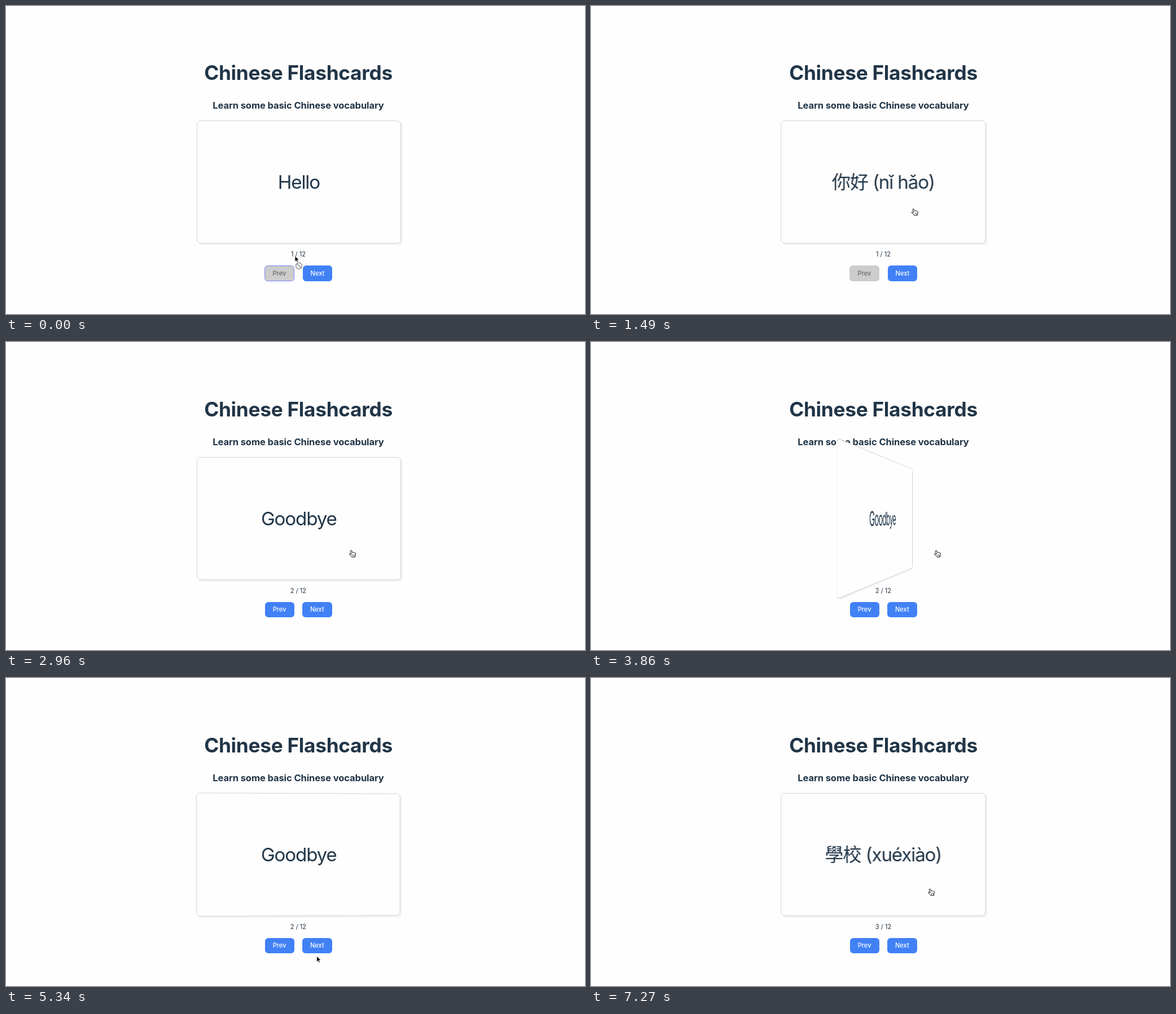
Write an HTML page that moves like this. It is 1026 by 546 pixels and loops after 8 s.

```html
<!DOCTYPE html>
<html lang="en">
<head>
<meta charset="utf-8">
<title>Flashcards</title>
<style>
  html, body { margin: 0; width: 100%; height: 100%; overflow: hidden; background: #fefefe; }
  body {
    position: relative;
    color: #213547;
    font-family: Inter, "Noto Sans CJK TC", "Noto Sans CJK SC", "Noto Sans CJK", sans-serif;
    font-optical-sizing: none;
  }
  .line {
    position: absolute; left: 18px; width: 1000px; height: 50px;
    line-height: 50px; text-align: center; white-space: nowrap;
  }
  #content { position: absolute; left: 0; top: 0; width: 1026px; height: 546px; }
  #title { top: 94px; font-size: 35.3px; font-weight: 700; letter-spacing: -.009em; }
  #sub { top: 151px; font-size: 16.6px; font-weight: 700; letter-spacing: -.008em; }
  #count { top: 415px; font-size: 11.1px; }

  #scene {
    position: absolute; left: 337.5px; top: 203px; width: 362.6px; height: 217.8px;
    perspective: 707px; perspective-origin: calc(50% - .75px) 50%;
  }
  #card {
    width: 100%; height: 100%;
    transform-style: preserve-3d; transform-origin: calc(50% - .75px) 50%;
  }
  .face {
    position: absolute; inset: 0; box-sizing: border-box;
    display: flex; align-items: center; justify-content: center;
    background: #fefefe; border: 1px solid #d2d2d2; border-radius: 7px;
    box-shadow: 2.5px 2.5px 2px rgba(0, 0, 0, .06);
    font-size: 33.2px; line-height: 50px; letter-spacing: -.035em; white-space: nowrap;
    backface-visibility: hidden;
  }
  #back { transform: rotateY(180deg); }

  .btn {
    position: absolute; box-sizing: border-box; top: 460.8px; height: 26.8px;
    display: flex; align-items: center; justify-content: center;
    border-radius: 5.7px; background: #4181f6; color: #fff;
    font-size: 11.1px; font-weight: 500; line-height: 14px;
  }
  #prev { left: 458.6px; width: 52px; }
  #next { left: 525px; width: 52.6px; }
  #next.hover { background: #2f6be8; }
  .first .btn { top: 460px; height: 28.2px; }
  .first #prev { left: 457.9px; width: 53.3px; background: #ccc; color: #6a6a6a; }
  .first #prev.hover { border: 1px solid #7d83fb; }
  .first #next { left: 525.7px; }

  #pointer { position: absolute; left: 0; top: 0; width: 24px; height: 30px; overflow: visible; }
</style>
</head>
<body>
<div id="content">
  <div id="title" class="line">Chinese Flashcards</div>
  <div id="sub" class="line">Learn some basic Chinese vocabulary</div>
  <div id="scene">
    <div id="card">
      <div id="front" class="face"></div>
      <div id="back" class="face"></div>
    </div>
  </div>
  <div id="count" class="line"></div>
</div>
<div id="buttons">
  <div id="prev" class="btn">Prev</div>
  <div id="next" class="btn">Next</div>
</div>
<svg id="pointer">
  <g id="arrow">
    <path d="M0 0V10.4L2.4 8.2L4 11.8L5.7 11L4.1 7.6L7.3 7.3Z" fill="#000" stroke="#fff" stroke-width=".8"/>
  </g>
  <g id="badge" fill="none">
    <circle cx="7" cy="17.6" r="5.4" fill="#fff" stroke="#fff" stroke-width="3"/>
    <path d="M3.2 13.8L10.8 21.4" stroke="#8c8c8c" stroke-width="1.5"/>
    <circle cx="7" cy="17.6" r="5.4" stroke="#8c8c8c" stroke-width="1.5"/>
  </g>
  <g id="hand" stroke="#000" stroke-linejoin="round" stroke-linecap="round">
    <path stroke-width=".95" fill="#fff" d="M-1.3 1.5Q-.8 -.1 .6 .7L2.3 4.3Q3.8 3.4 4.5 4.5Q5.9 3.8 6.4 5Q7.9 4.7 7.9 6.3Q8 8.6 6.9 10.1V12.2H1.4Q.6 10.4 -2.7 7.9Q-3.9 6.5 -2.6 6.1Q-1.6 5.9 .2 7Z"/>
    <path stroke-width=".6" fill="none" d="M2.6 8V10M4.2 8V10M5.8 8V10"/>
  </g>
</svg>
<script>
const LOOP = 8000, STEP = 148, FLIP_MS = 600;

const words = [
  ["Hello", "你好 (nǐ hǎo)"],
  ["Goodbye", "再見 (zàijiàn)"],
  ["School", "學校 (xuéxiào)"]
];
const nextClicks = [2600, 5700];
const cardClicks = [834, 1864, 3704, 4800, 6614];

// time, x, y of the pointer's tip
const path = [
  [0, 512, 443], [148, 518, 425], [296, 544, 395], [444, 565, 370], [592, 571.4, 359],
  [2072, 571.4, 359], [2220, 561, 440], [2368, 552, 506], [2516, 551, 491],
  [2664, 550, 476], [2812, 584, 418], [2960, 611.7, 369],
  [4884, 611.7, 369], [5032, 604, 390], [5180, 574, 455], [5328, 550.6, 493],
  [5476, 550, 484], [5624, 550, 476], [5920, 551, 474], [6068, 579, 418], [6216, 600.7, 373.4]
];

const $ = id => document.getElementById(id);
const show = (id, on) => { $(id).style.display = on ? "" : "none"; };
const put = (id, text) => { if ($(id).textContent !== text) $(id).textContent = text; };
const countBefore = (times, t) => times.filter(c => c <= t).length;
const inside = (x, y, l, t, r, b) => x > l && x < r && y > t && y < b;

// cubic-bezier(.25, .1, .25, 1)
function ease(p) {
  if (p >= 1) return 1;
  const curve = (s, a, b) => 3 * a * s * (1 - s) ** 2 + 3 * b * s * s * (1 - s) + s ** 3;
  let lo = 0, hi = 1;
  for (let i = 0; i < 24; i++) {
    const mid = (lo + hi) / 2;
    if (curve(mid, .25, .25) < p) lo = mid; else hi = mid;
  }
  return curve(lo, .1, 1);
}

function cardAngle(t) {
  const n = countBefore(cardClicks, t);
  if (!n) return 0;
  const k = ease((t - cardClicks[n - 1]) / FLIP_MS);
  return 180 * (n % 2 ? k : 1 - k);
}

function pointerAt(t) {
  const i = path.findIndex(p => p[0] > t);
  if (i < 0) return path[path.length - 1].slice(1);
  const [t0, x0, y0] = path[i - 1], [t1, x1, y1] = path[i];
  const k = (t - t0) / (t1 - t0);
  return [x0 + (x1 - x0) * k, y0 + (y1 - y0) * k];
}

function draw(t) {
  const page = countBefore(nextClicks, t);
  const blocked = t < STEP;
  const [x, y] = pointerAt(t);
  const onNext = inside(x, y, 525, 460, 578, 488);
  const onCard = inside(x, y, 337, 203, 700, 421);

  put("front", words[page][0]);
  put("back", words[page][1]);
  put("count", page + 1 + " / 12");
  $("card").style.transform = `rotateY(${cardAngle(t)}deg)`;
  $("content").style.top = page ? "1px" : "0";
  $("buttons").className = page ? "" : "first";
  $("prev").classList.toggle("hover", blocked);
  $("next").classList.toggle("hover", onNext);

  show("hand", onCard || onNext);
  show("arrow", !onCard && !onNext);
  show("badge", blocked);
  $("pointer").style.transform = `translate(${x}px, ${y}px)`;
}

const start = performance.now();
function tick() {
  const t = (performance.now() - start) % LOOP;
  draw(Math.floor(t / STEP) * STEP);
  requestAnimationFrame(tick);
}
tick();
</script>
</body>
</html>
```
